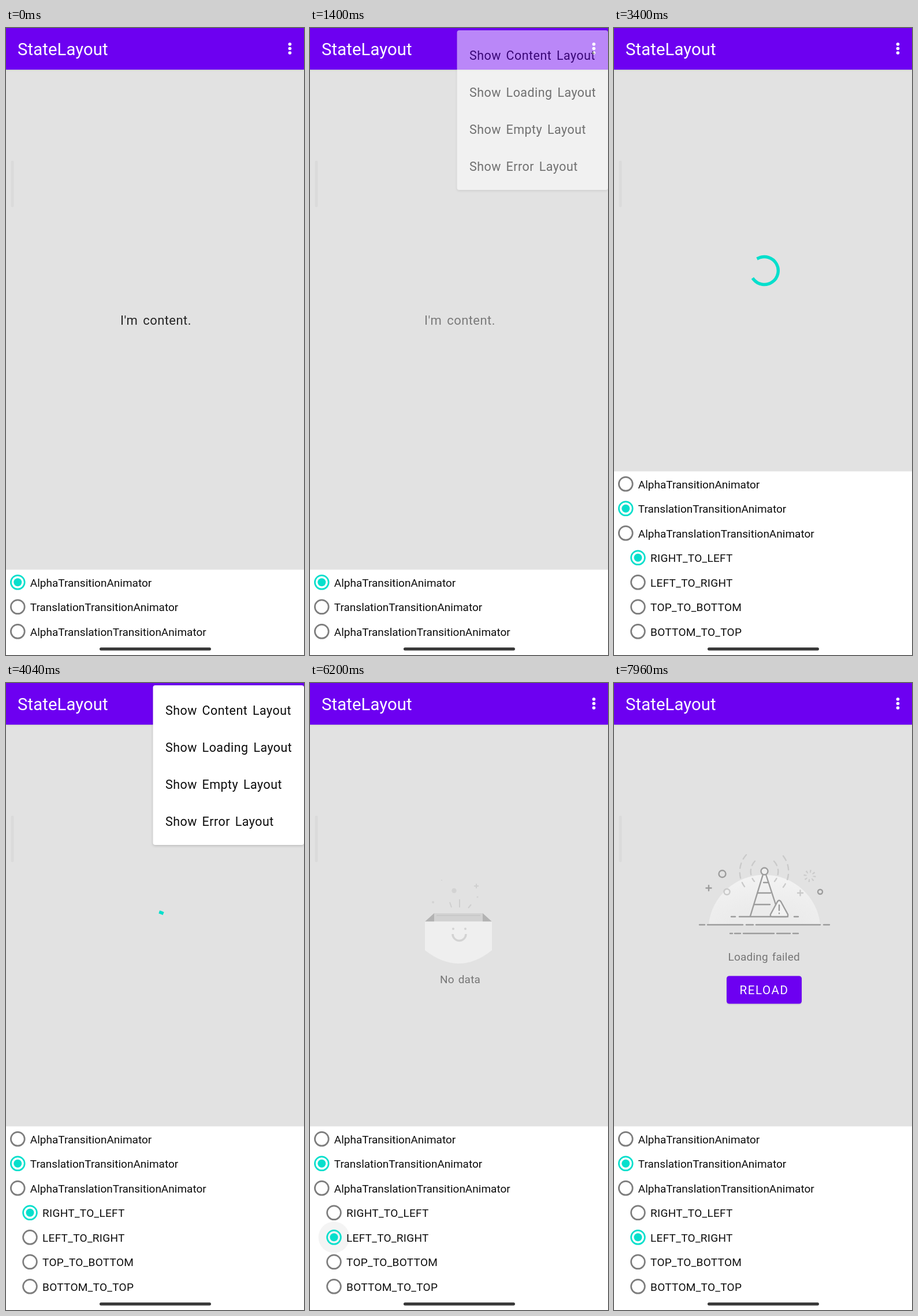
Recreate the animation shown at these times as an HTML page. Size 516x1084 px, loop 8000 ms.

```html
<!DOCTYPE html>
<html lang="en">
<head>
<meta charset="utf-8">
<title>StateLayout</title>
<style>
  html, body { margin: 0; width: 100%; height: 100%; overflow: hidden; background: #fff; }
  svg { display: block; width: 516px; height: 1084px; }
  text { font: 19px Roboto, "Open Sans", sans-serif; fill: #0c0c0c; white-space: pre; }
  .title { font-size: 29.3px; fill: #fff; letter-spacing: .1px; }
  .menu { font-size: 21.5px; letter-spacing: .45px; word-spacing: 3px; }
  .body { font-size: 22px; letter-spacing: .45px; word-spacing: 3px; fill: #262626; }
  .note { letter-spacing: .2px; word-spacing: 2px; fill: #767676; }
  .button { font-size: 20.5px; letter-spacing: 1.6px; fill: #fff; }
  .caps { letter-spacing: .3px; }
  .line { fill: none; stroke: #9c9c9c; stroke-width: 2.4; stroke-linecap: round; stroke-linejoin: round; }
  .pale { stroke: #cacaca; }
  filter { color-interpolation-filters: sRGB; }
</style>
</head>
<body>
<svg viewBox="0 0 516 1084">
  <defs>
    <filter id="shade" x="-20%" y="-20%" width="140%" height="150%">
      <feDropShadow dx="0" dy="1.500" stdDeviation="2.200" flood-opacity=".18"/>
    </filter>
    <filter id="edge" x="-5%" y="-10%" width="110%" height="130%">
      <feDropShadow dx="0" dy="1" stdDeviation="1.200" flood-opacity=".12"/>
    </filter>
    <radialGradient id="dome" cx=".5" cy="1" r="1" gradientTransform="translate(0 0)">
      <stop offset=".3" stop-color="#ebebeb"/><stop offset="1" stop-color="#f3f3f3"/>
    </radialGradient>
    <clipPath id="menuClip"><rect id="clipBox"/></clipPath>
  </defs>
  <rect width="516" height="1084" fill="#e2e2e2"/>

  <text id="content" class="body" x="198" y="513">I'm content.</text>
  <path id="spinner" fill="none" stroke="#06dfcc" stroke-width="5.400" stroke-linecap="square"/>

  <g id="empty">
    <path d="M215 398H299V412H215Z" fill="#d2d2d2"/>
    <path d="M219 402H295" stroke="#c6c6c6" stroke-width="1.5"/>
    <path d="M199 412.500L215 398V412.500ZM315 412.500L299 398V412.500Z" fill="#b3b3b3"/>
    <path d="M199 412.500H315V462Q258 508 199 462Z" fill="#efefef"/>
    <path d="M247 434A11.500 11.500 0 0 0 270 434" fill="none" stroke="#d3d3d3" stroke-width="3.5"/>
    <path d="M242 379L245 388M259 374V388M279 383L274 389M284 351H292M288 347V355" stroke="#cfcfcf" stroke-width="2"/>
    <g fill="#d3d3d3">
      <circle cx="248" cy="425" r="2"/><circle cx="269" cy="425" r="2"/>
      <circle cx="249.500" cy="359" r="4.2"/><circle cx="213" cy="379" r="2"/>
      <circle cx="290" cy="370" r="1.5"/><circle cx="228" cy="341" r="1"/>
    </g>
    <text class="note" x="225" y="519">No data</text>
  </g>

  <g id="error">
    <path d="M164 417A97 95 0 0 1 357 417Z" fill="url(#dome)"/>
    <g class="line">
      <path d="M148 418H157M162 418H223M229 418H241M246 418H357M363 418H373M201 433H205M209 433H219M224 433H277M282 433H305M310 433H319M203 404H210M217 404H301M312 404H319"/>
      <path d="M258 331L236 403M263 331L280 383M259 345H266M249 363H271M242 383H270"/>
      <circle cx="260.500" cy="325.500" r="6" fill="#eee"/>
      <path d="M283 378Q286 373.500 289 378L301 400Q302 404 298 404H274Q270 404 271 400Z" fill="#f2f2f2"/>
      <path d="M286 384V393M286 398V398.500"/>
      <circle cx="187.500" cy="330" r="6"/><circle cx="357" cy="361" r="4"/>
      <path d="M159.500 354.500H168.500M164 350V359"/>
    </g>
    <g class="line pale">
      <circle cx="195.500" cy="361" r="5"/>
      <path d="M318 363H327M322.500 358.500V367.500"/>
      <path d="M229 297A44 44 0 0 0 226 352M293 299A44 44 0 0 1 293 353" stroke-dasharray="9 8"/>
      <path d="M244 308A26 26 0 0 0 243 343M277 308A26 26 0 0 1 278 343" stroke-dasharray="9 7"/>
      <circle cx="339" cy="333.500" r="8" stroke-width="5" stroke-linecap="butt" stroke-dasharray="2 4.283"/>
    </g>
    <text class="note" x="197.500" y="480">Loading failed</text>
    <rect x="195" y="506.500" width="130" height="48" rx="4.500" fill="#6d00f1" filter="url(#edge)"/>
    <text class="button" x="217.500" y="538.300">RELOAD</text>
  </g>

  <rect x="8.500" y="229.500" width="5" height="80" rx="2" fill="#dadada"/>
  <rect width="516" height="72" fill="#6d00f1" filter="url(#edge)"/>
  <text class="title" x="20" y="46.500">StateLayout</text>
  <g fill="#fff">
    <circle cx="491.500" cy="28" r="2.8"/><circle cx="491.500" cy="35.500" r="2.8"/><circle cx="491.500" cy="43" r="2.8"/>
  </g>

  <rect id="panel" width="516" height="400" fill="#fff"/>
  <g id="modes"></g>
  <g id="directions"></g>
  <rect x="162" y="1071" width="193" height="5.200" rx="2.600" fill="#3a3a3a"/>

  <g id="menu">
    <rect id="card" rx="4" fill="#fff" filter="url(#shade)"/>
    <g clip-path="url(#menuClip)"><g id="items"></g></g>
  </g>
</svg>
<script>
const LOOP = 8000;
const MENUS = [[600, 1265], [3700, 4440], [6780, 7470]];
const MODE_TAP = 2300, DIRECTION_TAP = 5950;
const ROW = 42.5;

const $ = id => document.getElementById(id);
const set = (el, attrs) => { for (const k in attrs) el.setAttribute(k, attrs[k]); };
const ramp = (t, start, length) => Math.min(1, Math.max(0, (t - start) / length));
const ease = p => (1 - Math.cos(Math.PI * p)) / 2;
const show = (id, on) => { $(id).style.display = on ? '' : 'none'; };
const slide = (id, x) => set($(id), { transform: `translate(${x} 0)` });

function addRadios(id, labels, x, y, style) {
  $(id).innerHTML = labels.map((label, i) => `
    <g transform="translate(${x} ${y + i * ROW})">
      <circle class="ripple" r="0"/>
      <circle class="ring" r="11.9" fill="none" stroke-width="2.7"/>
      <circle class="dot" fill="#06dfcc"/>
      <text class="${style}" x="21.500" y="7.500">${label}</text>
    </g>`).join('');
}

function drawRadios(id, from, to, tap, t) {
  const p = ramp(t, tap, 160);
  [...$(id).children].forEach((row, i) => {
    const on = i === from ? 1 - p : i === to ? p : 0;
    set(row.querySelector('.ring'), { stroke: on > .5 ? '#06dfcc' : '#7d7d7d' });
    set(row.querySelector('.dot'), { r: 7 * on });
    if (i === to) set(row.querySelector('.ripple'), {
      r: 27 * ease(ramp(t, tap - 120, 240)),
      opacity: .1 * (1 - ramp(t, tap + 130, 220))
    });
  });
}

addRadios('modes', ['AlphaTransitionAnimator', 'TranslationTransitionAnimator',
  'AlphaTranslationTransitionAnimator'], 20.3, 958.3, '');
addRadios('directions', ['RIGHT_TO_LEFT', 'LEFT_TO_RIGHT', 'TOP_TO_BOTTOM', 'BOTTOM_TO_TOP'],
  41.5, 915.8, 'caps');
$('items').innerHTML = ['Content', 'Loading', 'Empty', 'Error'].map((name, i) =>
  `<text class="menu" x="276" y="${55 + 64 * i}">Show ${name} Layout</text>`).join('');

// Cubic with control points (0,0) (.4,0) (.2,1) (1,1), solved for x.
function trim(x) {
  let lo = 0, hi = 1;
  for (let i = 0; i < 24; i++) {
    const u = (lo + hi) / 2, v = 1 - u;
    if (1.2 * u * v * v + .6 * u * u * v + u * u * u < x) lo = u; else hi = u;
  }
  return lo * lo * (3 - 2 * lo);
}

function drawSpinner(t, cy) {
  const phase = ((t - 1313) / 1333 + 10) % 1;
  const base = -180 + (t - 3400) * 720 / 4444 + 90 * phase;
  const tail = base + 270 * trim(ramp(phase, .5, .5));
  const head = base + 270 * trim(ramp(phase, 0, .5)) + .1;
  const point = deg => {
    const a = deg * Math.PI / 180;
    return `${260.3 + 24 * Math.cos(a)} ${cy + 24 * Math.sin(a)}`;
  };
  set($('spinner'), { d: `M${point(tail)}A24 24 0 ${head - tail > 180 ? 1 : 0} 1 ${point(head)}` });
}

function drawMenu(t) {
  const span = MENUS.find(([open, close]) => t >= open && t < close + 300);
  show('menu', span);
  if (!span) return;
  const [open, close] = span;
  const left = 1 - ramp(t, open, 250);
  const dx = 107 * left ** 3.4, dy = -106 * left ** 2.8;
  const box = { x: 254.5 + 2 * dx, y: 4, width: 261.5 - 2 * dx, height: 276 + 2 * dy };
  set($('card'), box);
  set($('clipBox'), box);
  set($('items'), { transform: `translate(${dx} ${dy})` });
  set($('menu'), { opacity: ramp(t, open, 80) * (1 - ramp(t, close, 290)) });
}

function draw(t) {
  const expanded = t >= MODE_TAP;
  set($('panel'), { y: expanded ? 766.5 : 936.5 });
  set($('modes'), { transform: `translate(0 ${expanded ? -4 * ROW : 0})` });
  show('directions', expanded);
  drawRadios('modes', 0, 1, MODE_TAP, t);
  drawRadios('directions', 0, 1, DIRECTION_TAP, t);

  set($('content'), { opacity: 1 - ramp(t, 1265, 300) });
  set($('spinner'), { opacity: ramp(t, 1565, 300) });
  drawSpinner(t, expanded ? 419.5 : 504.5);

  const toEmpty = ease(ramp(t, 4520, 350));
  const toError = ease(ramp(t, 7540, 320));
  slide('spinner', -516 * toEmpty);
  slide('empty', 516 * (1 - toEmpty + toError));
  slide('error', -516 * (1 - toError));
  show('spinner', toEmpty < 1);
  show('empty', toEmpty > 0 && toError < 1);
  show('error', toError > 0);
  drawMenu(t);
}

const begin = performance.now();
function tick() {
  draw((performance.now() - begin) % LOOP);
  requestAnimationFrame(tick);
}
tick();
</script>
</body>
</html>
```
